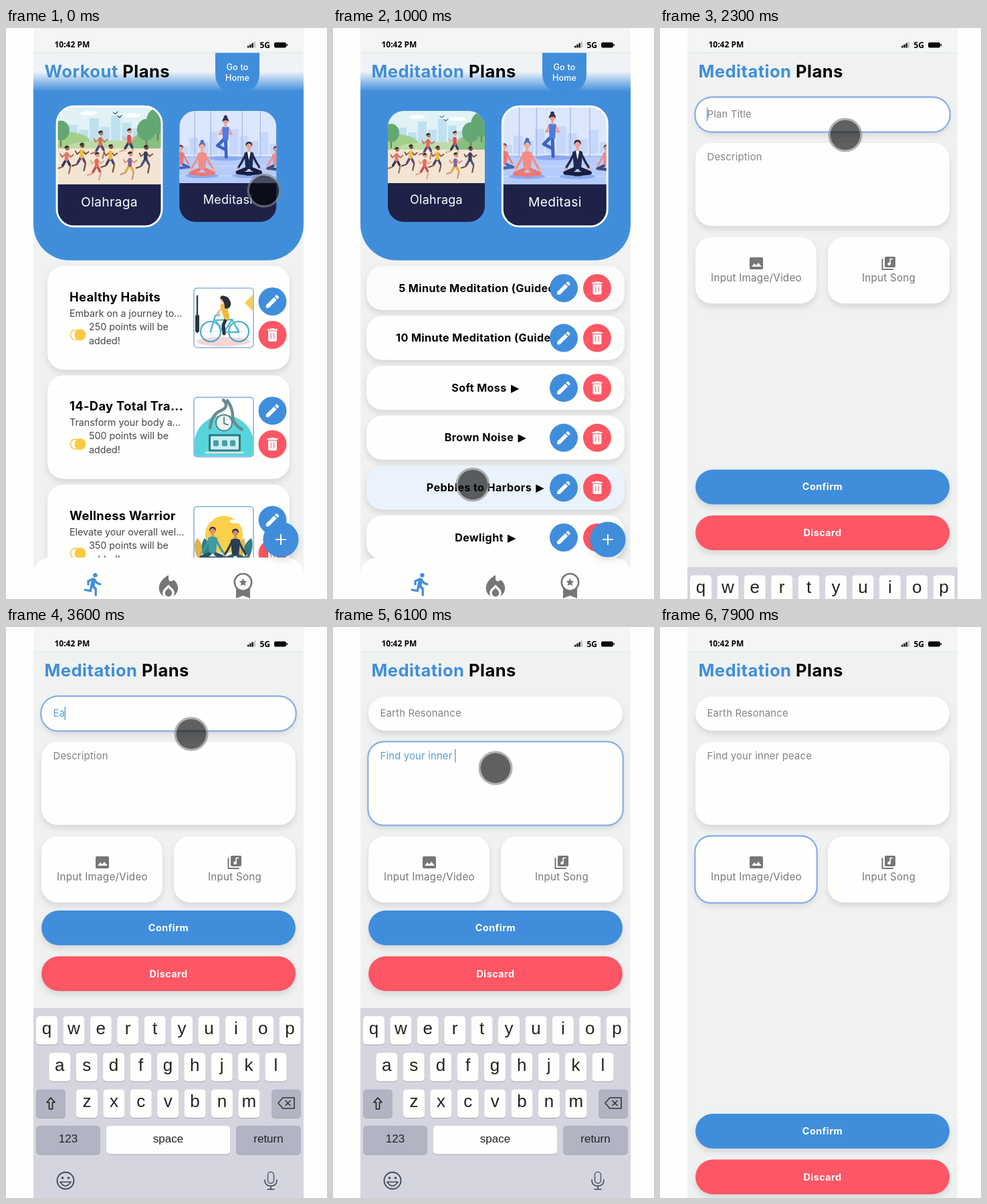
Write an HTML page that moves like this. It is 480x854 px and loops after 8 s.

```html
<!DOCTYPE html>
<html lang="en">
<head>
<meta charset="utf-8">
<title>Workout and meditation plans</title>
<style>
html, body { margin: 0; width: 100%; height: 100%; overflow: hidden; background: #fefefd; }
svg { display: block; width: 100vw; height: 100vh; }
text { font-family: Inter, sans-serif; white-space: pre; }
.sys { font: 700 12px "Open Sans", sans-serif; }
.head { font-size: 25.6px; font-weight: 700; letter-spacing: .45px; }
.name { font-size: 18.3px; font-weight: 700; letter-spacing: .35px; }
.body { font-size: 14.3px; fill: #43464d; }
.row { font-size: 16.2px; font-weight: 700; letter-spacing: .35px; text-anchor: middle; }
.label { font-size: 18px; letter-spacing: .25px; fill: #fff; text-anchor: middle; }
.field { font-size: 14.8px; letter-spacing: .2px; }
.pick { font-size: 15.2px; letter-spacing: .25px; fill: #777; text-anchor: middle; }
.btn { font-size: 14.4px; font-weight: 700; letter-spacing: .45px; fill: #fff; text-anchor: middle; }
.home { font-size: 12.6px; font-weight: 500; letter-spacing: .15px; fill: #fff; text-anchor: middle; }
.key { font: 26px "Liberation Sans", sans-serif; fill: #222; text-anchor: middle; }
.wide { font-size: 17px; }
.lift { filter: drop-shadow(0 5px 5px #0000001c); }
.cap { filter: drop-shadow(0 1px 0 #0000003a); }
</style>
</head>
<body>
<svg id="stage" viewBox="0 0 480 854" preserveAspectRatio="none"></svg>
<script>
const BLUE = '#408edb', RED = '#fd5664', NAVY = '#1e2248', GREY = '#767676', PAPER = '#fefefc';
const LOOP = 8000;

// ---- drawing helpers ----
const rect = (x, y, w, h, r, fill, more = '') =>
  `<rect x="${x}" y="${y}" width="${w}" height="${h}" rx="${r}" fill="${fill}" ${more}/>`;
const dot = (x, y, r, fill, more = '') => `<circle cx="${x}" cy="${y}" r="${r}" fill="${fill}" ${more}/>`;
const oval = (x, y, rx, ry, fill) => `<ellipse cx="${x}" cy="${y}" rx="${rx}" ry="${ry}" fill="${fill}"/>`;
const path = (d, fill, more = '') => `<path d="${d}" fill="${fill}" ${more}/>`;
const line = (d, color, w) =>
  path(d, 'none', `stroke="${color}" stroke-width="${w}" stroke-linecap="round" stroke-linejoin="round"`);
const text = (cls, x, y, s, more = '') => `<text class="${cls}" x="${x}" y="${y}" ${more}>${s}</text>`;
const at = (x, y, body, s = 1) => `<g transform="translate(${x} ${y}) scale(${s})">${body}</g>`;
const icon = (x, y, s, body) => at(x, y, at(-12, -12, body), s);
const each = (list, fn) => list.map(fn).join('');
const hanging = (x, y, w, h, r) =>
  path(`M${x} ${y}h${w}v${h - r}a${r} ${r} 0 0 1 ${-r} ${r}h${2 * r - w}a${r} ${r} 0 0 1 ${-r} ${-r}z`, BLUE);

const pencil = path('M3 17.25V21h3.75L17.8 9.95l-3.75-3.75zM20.7 7a1 1 0 0 0 0-1.4l-2.3-2.3a1 1 0 0 0-1.4 0l-1.85 1.85 3.75 3.75z', '#fff');
const bin = path('M6 19a2 2 0 0 0 2 2h8a2 2 0 0 0 2-2V7H6zM19 4h-3.5l-1-1h-5l-1 1H5v2h14z', '#fff') +
  line('M10 10v7M14 10v7', '#f98f92', 1.4);
const editBtn = (x, y) => dot(x, y, 21, BLUE) + icon(x, y, 1.08, pencil);
const binBtn = (x, y) => dot(x, y, 21, RED) + icon(x, y, 1.08, bin);

// ---- illustrations ----
const runner = (x, y, shirt, legs, skin) => at(x, y,
  line('M-1 17L-6 25L-12 27M1 17L5 24L3 33', skin, 2) +
  line('M-1 16L-5 23M1 16L4 22', legs, 3.2) +
  line('M0 7L-6 12L-8 8M1 7L5 12L9 9', skin, 1.6) +
  line('M0 8L0 15', shirt, 4.8) + dot(1, 1, 2.6, skin) + path('M-2.5 1a3.2 3.2 0 0 1 6-2z', '#3a2a35'), 1.08);

const sitter = (x, y, top, legs, skin, hair, s = 1) => at(x, y,
  line('M-5 16L-11 28L-16 36M5 16L11 28L16 36', top, 3.2) +
  path('M-7 14Q0 9 7 14L5 38H-5z', top) +
  line('M-5 38L-17 43L3 45M5 38L17 43L-3 45', legs, 5.5) +
  dot(-17, 37, 1.8, skin) + dot(17, 37, 1.8, skin) + rect(-1.7, 6, 3.4, 6, 1, skin) +
  dot(0, 3, 4.4, skin) + path('M-4.9 4Q-5.5-3 0-3T4.9 4Q2.5-.5 0-.5T-4.9 4', hair), s);

const skyline = (y, color) => each([12, 25, 18, 34, 22, 38, 28, 20, 33, 16], (h, i) => rect(i * 15, y - h, 13, h, 0, color));

const park = rect(0, 0, 145, 108, 0, '#e0f2f6') + skyline(50, '#bfe0ef') +
  oval(44, 9, 12, 3, '#fff') + oval(104, 12, 13, 3, '#fff') +
  oval(14, 50, 32, 15, '#a3cf8c') + oval(75, 55, 60, 8, '#bcdca4') + oval(132, 50, 30, 15, '#86bf7f') +
  each([[5, 33, 12], [124, 32, 13], [140, 20, 16]], ([x, y, r]) =>
    line(`M${x} ${y}V${y + r + 10}`, '#73634f', 1.6) + oval(x, y, r, r * 1.15, '#63a873')) +
  line('M78 8l3 2 3-3M84 13l3 2 3-3', '#28384a', 1) +
  rect(0, 58, 145, 50, 0, '#f3e5d4') +
  each([[60, 36, '#e26b4c', '#59437b', '#b97858'], [100, 33, '#d94c56', '#333c61', '#e8a785'],
    [13, 57, '#ef7265', '#35355c', '#a96850'], [34, 53, '#f2bd42', '#654677', '#74483d'],
    [55, 66, '#e36a58', '#c84952', '#e6a481'], [74, 55, '#f2b83a', '#43456b', '#855440'],
    [101, 65, '#8062a5', '#e0b143', '#d98f70'], [123, 56, '#373d5f', '#4e5a75', '#754a42']], r => runner(...r));

const studio = rect(0, 0, 145, 108, 0, '#dce6fd') + skyline(65, '#c6d7fb') +
  rect(0, 69, 145, 39, 0, '#b5ccfb') + line('M0 83H145M0 97H145', '#d2dffc', 1) +
  each([23, 47, 94, 121], x => line(`M${x} 0V70`, '#a3b9f4', 1.3)) + line('M0 69H145', '#9ab4f2', 1.3) +
  each([[34, 97], [104, 97], [70, 71]], ([x, y]) => oval(x, y, 25, 3.5, '#8ca9ee')) +
  at(69, 15, line('M0 27L1 54', '#3b64c8', 4.6) + line('M-2 27L-12 37L0 43', '#3b64c8', 4.6) +
    line('M-4 11L-9 20L0 18L9 20L4 11', '#f39a87', 2.6) + path('M-5 9h10l-1 20h-8z', '#4d7be1') +
    rect(-1.5, 3, 3, 7, 1, '#f39a87') + dot(0, 0, 4, '#f39a87') +
    path('M-5 1Q-4-6 0-6T5 1Q1-3-5 1', '#363055') + dot(0, -6, 2.6, '#363055')) +
  sitter(2, 53, '#ef7777', '#4c64b4', '#f3a08c', '#493452', .72) +
  sitter(144, 55, '#f18a82', '#434a7a', '#e59783', '#4b3346', .72) +
  sitter(34, 50, '#f28e86', '#ee7776', '#f6aa94', '#476fc5') + dot(34, 46, 2.8, '#476fc5') +
  sitter(104, 49, '#1f284e', '#171e3d', '#f2a08b', '#262441') + path('M101.5 61h5l-2.5 13z', '#fff');

const bike = each([24, 66], x => dot(x, 65, 15, 'none', 'stroke="#49abc2" stroke-width="2.2"') +
    line(`M${x - 14} 65h28M${x} 51v28`, '#b8dce5', .8)) +
  line('M24 65L34 47L59 48L46 66H24M46 66L34 47M66 65L59 41L53 40', '#54bdd0', 2.6);
const rider = line('M42 44L47 55L46 68', '#2d3548', 5) + line('M47 27L42 43', '#f2bd36', 9) +
  line('M49 30L56 38L54 42', '#eeb097', 2.6) + dot(47, 17, 4.6, '#efb195') +
  path('M41 31Q31 26 40 14Q50 8 52 15Q45 18 45 30z', '#292d35');
const cyclist = oval(44, 80, 40, 7, '#f8d4d5') + line('M5 12V66', '#343a43', 2.4) + rect(2, 40, 6, 26, 2, '#30343c') +
  path('M76 22L88 10V34z', '#f6cb55') +
  `<g transform="translate(91 0) scale(-1 1)">${bike}${rider}</g>`;

const desk = path('M1 88V62A45 45 0 0 1 88 58V88z', '#56d6dc') +
  line('M24 46Q26 26 40 20T44 4M50 5Q58 16 58 28T72 48', '#6c8b91', 4.5) +
  dot(45, 38, 12, '#e9f5f3', 'stroke="#557e87" stroke-width="2"') + line('M45 30V39L51 41', '#45646c', 1.6) +
  rect(22, 55, 48, 26, 2, '#2d7985') + rect(25, 58, 42, 20, 1, '#c6eff0') +
  each([33, 46, 58], x => rect(x - 4, 64, 8, 9, 2, '#4d9da8')) + rect(16, 81, 59, 3, 1.5, '#d7e2e2');

const sunrise = dot(45, 42, 28, '#fbd04a') + oval(20, 20, 9, 3, '#fff') + oval(64, 22, 11, 3, '#fff') +
  each([8, 19, 69, 80], (x, i) => path(`M${x} 82Q${x - 13} 60 ${x + (i < 2 ? -3 : 6)} 47Q${x + 11} 61 ${x} 82`, i % 2 ? '#307f82' : '#e4b347')) +
  sitter(28, 33, '#3d9ca3', '#285367', '#d88f70', '#31394b') +
  sitter(62, 36, '#283d58', '#2e6072', '#ce8969', '#272f40');

// ---- plans screen ----
const tab = (id, cx, art, name) => `<g id="${id}">
  <g clip-path="url(#tabClip)">${at(-72.5, -83, art)}${rect(-73, 25, 146, 59, 0, NAVY)}</g>
  ${rect(-73, -83.5, 146, 167, 24, 'none', 'class="ring" stroke="#fff" stroke-width="2.7"')}
  ${text('label', 0, 56, name)}</g>`;

const planCard = ([title, sub, points, art], i) => at(0, i * 163.4,
  rect(62, 356, 362, 155, 24, PAPER, 'class="lift"') +
  text('name', 95, 409, title) + text('body', 95, 432, sub) +
  text('body', 124, 452, `${points} points will be`) + text('body', 124, 473, 'added!') +
  dot(104, 459, 7.5, 'none', 'stroke="#f8d169" stroke-width="2"') + dot(111, 459, 8.5, '#fbc840') +
  rect(281, 389, 89, 89, 5, '#fff') + at(281, 389, art) +
  rect(281, 389, 89, 89, 5, 'none', 'stroke="#8ab3e6" stroke-width="1.6"') +
  editBtn(398.5, 409) + binBtn(398.5, 459));

const plans = [
  ['Healthy Habits', 'Embark on a journey to...', 250, cyclist],
  ['14-Day Total Tra...', 'Transform your body a...', 500, desk],
  ['Wellness Warrior', 'Elevate your overall wel...', 350, sunrise]];
const tracks = ['5 Minute Meditation (Guided)', '10 Minute Meditation (Guided)',
  'Soft Moss', 'Brown Noise', 'Pebbles to Harbors', 'Dewlight'];
const rowTop = i => 356 + i * 74.6;

const trackRow = (name, i) => at(0, rowTop(i),
  rect(50, 0, 386, 66, 24, PAPER, 'class="lift track"') +
  text('row', 228, 38.5, `${name} <tspan font-family="DejaVu Sans, sans-serif" dx="2">▶</tspan>`) +
  editBtn(345, 33) + binBtn(395, 33));

const star = 'M0-6L1.8-2L6-1.6L2.8 1.2L3.8 5.4L0 3.2L-3.8 5.4L-2.8 1.2L-6-1.6L-1.8-2z';
const runIcon = path('M13.5 5.5a2 2 0 1 0 0-4 2 2 0 0 0 0 4zM9.9 19.4l1-4.4 2.1 2v6h2v-7.5l-2.1-2 .6-3c1.3 1.5 3.3 2.5 5.5 2.5v-2c-1.9 0-3.5-1-4.3-2.4l-1-1.6c-.4-.6-1-1-1.7-1l-.8.1L6 8.3V13h2V9.6l1.8-.7L8.2 17l-4.9-1-.4 2z', BLUE);
const fireIcon = path('M12 12.9l-2.1 2.1a2.9 2.9 0 0 0-.9 2.1a3 3 0 0 0 6 0a2.9 2.9 0 0 0-.9-2.1zM16 6l-.4.5C14.4 8 12 7.2 12 5.3V2S4 6 4 13c0 2.9 1.6 5.5 3.9 6.9A4.9 4.9 0 0 1 8.5 13.6L12 10.1l3.5 3.5a4.9 4.9 0 0 1 .6 6.2c1.9-1.2 3.3-3.1 3.7-5.3C20.5 11 18.8 7.6 16 6z', GREY);
const nav = rect(41, 792, 404, 90, 25, PAPER) +
  icon(131, 832, 1.6, runIcon) + icon(243, 836, 1.78, fireIcon) +
  path('M344 838H365V853L354.5 849L344 853z', GREY) + dot(354.5, 829, 12.7, PAPER, `stroke="${GREY}" stroke-width="2.6"`) +
  at(354.5, 829, path(star, GREY));

const plansScreen = `<g id="plans">
  ${hanging(41, 60, 404, 287.5, 54)}
  ${rect(41, 37, 404, 58, 0, 'url(#fade)')}
  ${hanging(313, 37, 66, 60, 27)}
  ${text('home', 346, 62.5, 'Go to')}${text('home', 346, 79, 'Home')}
  ${tab('sport', 154.5, park, 'Olahraga')}${tab('calm', 331.8, studio, 'Meditasi')}
  <g id="workouts">${each(plans, planCard)}</g>
  <g id="tracks">${each(tracks, trackRow)}</g>
  ${nav}
  <g class="lift">${dot(411, 765, 25.5, BLUE, 'id="fab" stroke-width="2"')}</g>
  <path id="plus" d="M403 765h16M411 757v16" stroke-width="2"/>
</g>`;

// ---- form screen ----
const box = (id, x, y, w, h, r) => rect(x, y, w, h, r, PAPER, 'class="lift"') +
  rect(x - .7, y - .7, w + 1.4, h + 1.4, r, 'none', `id="${id}" stroke="#86adeb" stroke-width="2.2"`);
const action = (y, fill, name) => rect(53, y, 380, 52, 26, fill, 'class="lift"') + text('btn', 243, y + 31, name);

const cap = (x, y, w, fill, label, cls = '') =>
  rect(x, y, w, 42.5, 5, fill, 'class="cap"') + text('key ' + cls, x + w / 2, y + (cls ? 25 : 26.5), label);
const keyRow = (letters, x, y) => each([...letters], (c, i) => cap(x + i * 40.4, y, 32, PAPER, c));
const DIM = '#b2b4c3';
const keyboard = rect(41, 0, 404, 310, 0, '#d4d5de') +
  keyRow('qwertyuiop', 45, 12) + keyRow('asdfghjkl', 64.3, 67) + keyRow('zxcvbnm', 105, 121.5) +
  cap(45, 121.5, 44, DIM, '') + line('M67 134L61 141H64.5V151H69.5V141H73z', '#222', 1.6) +
  cap(397, 121.5, 44, DIM, '') + line('M407 142L414 134H431V150H414zM418 138.5l7 7M425 138.5l-7 7', '#333', 1.6) +
  cap(45, 176, 96, DIM, '123', 'wide') + cap(150, 176, 185, PAPER, 'space', 'wide') + cap(344, 176, 97, DIM, 'return', 'wide') +
  dot(89, 258, 12.5, 'none', 'stroke="#3c465b" stroke-width="1.8"') + dot(84.5, 254, 1.8, '#3c465b') + dot(93.5, 254, 1.8, '#3c465b') +
  line('M81 260Q89 272 97 260z', '#3c465b', 1.6) +
  rect(391.5, 245, 9, 17, 4.5, 'none', 'stroke="#53617a" stroke-width="1.6"') +
  line('M387 257Q387 266 396 266T405 257M396 266V271M391 271h10', '#3c465b', 1.6);

const formScreen = `<g id="form">
  ${box('titleRing', 53, 104, 380, 51, 25.5)}${box('noteRing', 53, 172, 380, 124, 24)}
  ${box('imageRing', 53, 313, 181, 99, 24)}${rect(251, 313, 182, 99, 24, PAPER, 'class="lift"')}
  ${text('field', 70.5, 134, '', 'id="title"')}${text('field', 70.5, 197.5, '', 'id="note"')}
  <rect id="caret" width="1.2" height="20" fill="${BLUE}"/>
  ${rect(134, 343, 20, 18, 2, GREY)}${path('M137 357l4-5 3 3 3-4 5 6z', '#fff')}
  ${text('pick', 144, 379, 'Input Image/Video')}
  ${line('M332.5 346V361H348', GREY, 2)}${rect(336, 342, 16, 16, 2, GREY)}
  ${dot(342.5, 353, 2.3, '#fff')}${line('M344.2 353V345.5H347.5', '#fff', 1.6)}
  ${text('pick', 342, 379, 'Input Song')}
  <g id="dock">${action(-146, BLUE, 'Confirm')}${action(-77.5, RED, 'Discard')}${keyboard}</g>
</g>`;

const statusBar = rect(41, 0, 404, 36, 0, '#f4f6f5') + rect(41, 36, 404, 1.2, 0, '#e6e9e9') +
  text('sys', 72.5, 28.5, '10:42 PM') + text('sys', 379.5, 29.5, '5G') +
  each([3, 5, 7, 9], (h, i) => rect(361 + i * 3.2, 29.5 - h, 2.4, h, .5, i < 3 ? '#111' : '#bbb')) +
  rect(401, 21.5, 18, 8, 2.5, '#0c0c0c') + rect(419.5, 24, 1.6, 3, .5, '#0c0c0c');

const $ = id => document.getElementById(id);
$('stage').innerHTML = `<defs>
  <linearGradient id="fade" x2="0" y2="1"><stop stop-color="#eff2f3"/><stop offset=".48" stop-color="#f0f4f8"/>
    <stop offset="1" stop-color="${BLUE}"/></linearGradient>
  <clipPath id="tabClip">${rect(-72.5, -83, 145, 166, 24, '#000')}</clipPath></defs>
  ${rect(41, 0, 404, 854, 0, '#f0f2f2')}${plansScreen}${formScreen}${statusBar}
  <text class="head" x="57.5" y="74"><tspan id="kind" fill="${BLUE}"></tspan> Plans</text>
  <g id="touch">${dot(0, 0, 22.5, '#000', 'fill-opacity=".62"')}
  ${dot(0, 0, 23.8, 'none', 'stroke="#858585" stroke-opacity=".62" stroke-width="3.4"')}</g>`;

// ---- motion ----
const ease = (t, from, span) => {
  const u = Math.min(1, Math.max(0, (t - from) / span));
  return u * u * (3 - 2 * u);
};
const within = (t, a, b) => t >= a && t < b;

// time, x, y
const route = [[0, 386, 243], [600, 386, 243], [800, 330, 386], [900, 209, 683], [1200, 209, 683], [1500, 419, 790],
  [1900, 419, 790], [2200, 277, 160], [4600, 277, 160], [4900, 243, 211], [6500, 243, 211], [6700, 41, 480],
  [6900, 41, 480], [7200, 150, 366], [7400, 150, 366], [7800, 510, 410], [8000, 510, 410]];
const pointer = t => {
  const i = Math.max(1, route.findIndex(p => p[0] >= t));
  const [t0, x0, y0] = route[i - 1], [t1, x1, y1] = route[i];
  const u = ease(t, t0, t1 - t0);
  return [x0 + (x1 - x0) * u, y0 + (y1 - y0) * u];
};

// Row tint fades out over 250 ms after the pointer leaves.
const hover = (t, i) => Math.max(...[0, 100, 200].map(age => {
  const [x, y] = pointer(Math.max(0, t - age)), dy = y - rowTop(i);
  return x < 380 && dy > 0 && dy < 66 ? 1 - age / 250 : 0;
}));

const typed = (t, from, s) => s.slice(0, Math.max(0, Math.floor((t - from) / 70)));
const show = (id, on) => { $(id).style.display = on ? '' : 'none'; };
const rows = [...document.querySelectorAll('.track')];

const placeTab = (id, x, p) => {
  $(id).setAttribute('transform', `translate(${x} 207) scale(${1 + .075 * p})`);
  $(id).querySelector('.ring').style.opacity = p;
};

const fillField = (id, value, hint, focused) => {
  $(id).textContent = value || hint;
  $(id).setAttribute('fill', value && focused ? '#579bdc' : '#80838a');
};

function drawPlans(t) {
  const calm = t >= 200, p = ease(t, 200, 300), hot = t >= 1500;
  show('workouts', !calm);
  show('tracks', calm);
  placeTab('sport', 154.5, 1 - p);
  placeTab('calm', 331.8, p);
  rows.forEach((r, i) => {
    const h = calm ? hover(t, i) : 0;
    r.setAttribute('fill', `rgb(${254 - 20 * h},${254 - 12 * h},${252 - h})`);
  });
  $('fab').setAttribute('fill', hot ? '#f8fafc' : BLUE);
  $('fab').setAttribute('stroke', hot ? '#6fa8e2' : BLUE);
  $('plus').setAttribute('stroke', hot ? BLUE : '#fff');
}

function drawForm(t) {
  const onTitle = within(t, 2200, 4900), onNote = within(t, 4900, 6700);
  const title = typed(t, 3450, 'Earth Resonance');
  const note = typed(t, 4960, 'Find your inner peace');
  fillField('title', title, 'Plan Title', onTitle);
  fillField('note', note, 'Description', onNote);
  show('titleRing', onTitle);
  show('noteRing', onNote);
  show('imageRing', t >= 7300);

  const value = onTitle ? title : note, el = $(onTitle ? 'title' : 'note');
  const busy = within(t, 3500, 4500) || within(t, 5000, 6450);
  show('caret', (onTitle || onNote) && (busy || (t - 2200) % 1000 < 500));
  $('caret').setAttribute('x', 70 + (value ? el.getComputedTextLength() : 0));
  $('caret').setAttribute('y', onTitle ? 119 : 182.5);

  const rise = ease(t, 2178, 400) - ease(t, 6700, 400);
  $('dock').setAttribute('transform', `translate(0 ${874 - 304 * rise})`);
}

function draw(now) {
  const t = Math.floor(now % LOOP / 100) * 100;
  const editing = t >= 1900;
  show('plans', !editing);
  show('form', editing);
  $('kind').textContent = t < 200 ? 'Workout' : 'Meditation';
  (editing ? drawForm : drawPlans)(t);
  $('touch').setAttribute('transform', `translate(${pointer(t)})`);
}

const start = performance.now();
const tick = () => { draw(performance.now() - start); requestAnimationFrame(tick); };
tick();
</script>
</body>
</html>
```
